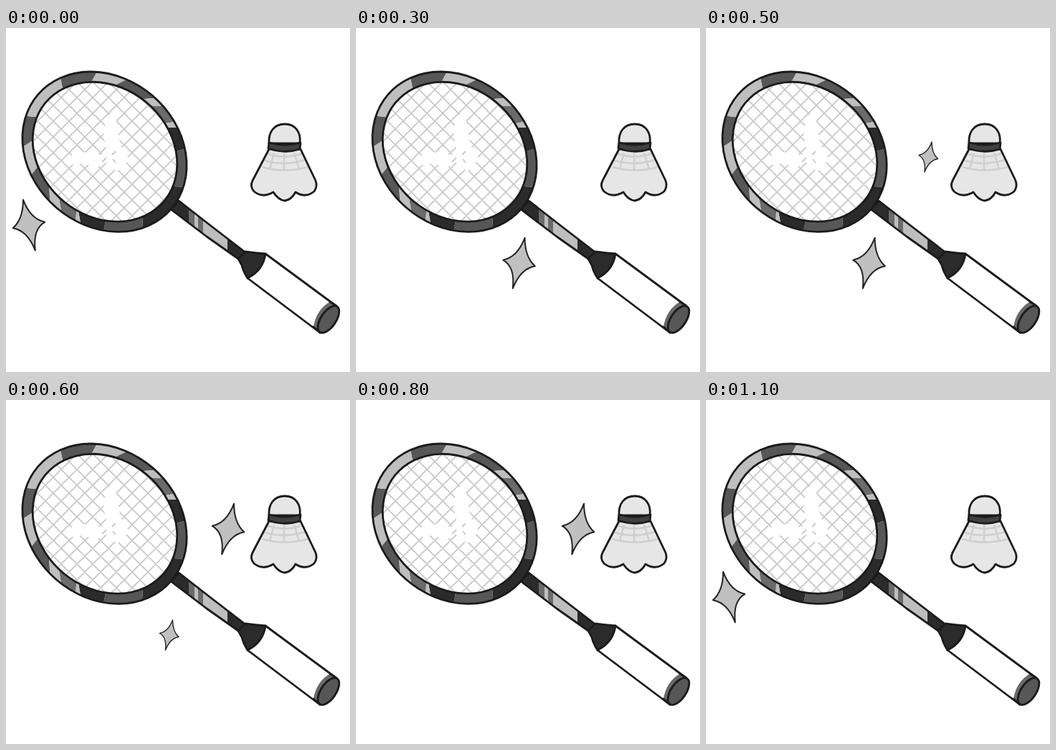
An HTML page that plays this animation: 480 px wide and 480 px high, repeating every 1.2 s.

```html
<!DOCTYPE html>
<html lang="en">
<head>
<meta charset="utf-8">
<title>Badminton</title>
<style>
  html, body { margin: 0; width: 100%; height: 100%; overflow: hidden; background: #fff; }
  svg { display: block; width: 100vw; height: 100vh; }
  .ink { stroke: #1b1b1b; stroke-width: 2.8; stroke-linejoin: round; stroke-linecap: round; }
  .string { stroke: #cacaca; stroke-width: 1.9; fill: none; }
</style>
</head>
<body>
<svg viewBox="0 0 480 480">
  <defs>
    <ellipse id="outer" rx="122.500" ry="103" transform="translate(137.500 172.700) rotate(40.700)"/>
    <ellipse id="inner" rx="107.500" ry="90" transform="translate(138 172.700) rotate(39.400)"/>
    <path id="shaft" d="M230 253L241 241 282 273 334 313 324 322 280 291Z"/>
    <path id="skirt" d="M367 169L344 213Q340 221 346 228Q358 238 373 229Q380 240 389 241Q398 240 404 229Q418 238 430 228Q435 221 432 213L411 169Z"/>
    <clipPath id="headClip"><use href="#outer"/></clipPath>
    <clipPath id="netClip"><use href="#inner"/></clipPath>
    <clipPath id="shaftClip"><use href="#shaft"/></clipPath>
    <clipPath id="skirtClip"><use href="#skirt"/></clipPath>
    <path id="star" d="M9-42Q9-10 26 5Q2 9-11 42Q-7 6-27-5Q-3-10 9-42Z"/>
  </defs>

  <g id="shaftBands" clip-path="url(#shaftClip)"></g>
  <use href="#shaft" class="ink" fill="none"/>

  <g id="rim" clip-path="url(#headClip)"></g>
  <use href="#inner" fill="#fff"/>
  <g clip-path="url(#netClip)">
    <path id="net" class="string"/>
    <path fill="#fff" d="M148 117L154 130 157 148 160 165 168 172 171 186 161 190 155 202 148 192 136 186 128 194 105 189 86 192 84 182 100 173 122 174 133 178 140 168 136 150 139 128Z"/>
    <path class="string" d="M134 187L140 181M148 177L153 172M149 183L153 188"/>
  </g>
  <use href="#outer" class="ink" fill="none"/>
  <use href="#inner" class="ink" fill="none"/>

  <path class="ink" fill="#fff" d="M362 315L461 388 438 425 337 349Z"/>
  <path fill="#686868" d="M452 382Q433 393 429 417L438 425 463 390Z"/>
  <path class="ink" fill="none" d="M452 382L460 387M429 417L438 425"/>
  <ellipse class="ink" fill="#575757" rx="21.500" ry="10.500" transform="translate(450 406.500) rotate(-56)"/>
  <path class="ink" fill="#2b2b2b" d="M324 322L334 312Q348 314 362 315Q359 338 337 349Q331 340 329 331Z"/>

  <g id="shuttle">
    <use href="#skirt" fill="#e6e6e6"/>
    <path clip-path="url(#skirtClip)" fill="none" stroke="#cfcfcf" stroke-width="2.500" d="M364 175Q389 184 413 175M361 185Q389 193 417 184M358 194Q389 203 421 194M374 174L368 197M388 174V199M402 174L409 197"/>
    <use href="#skirt" class="ink" fill="none"/>
    <path class="ink" fill="#e6e6e6" d="M367 161C366 145 374 134 389 134S412 146 410 161Z"/>
    <path class="ink" fill="#414141" d="M367 160Q389 166 411 160L410 169Q389 176 366 168Z"/>
  </g>
  <g id="stars"></g>
</svg>
<script>
const byId = id => document.getElementById(id);
const add = (parent, tag, attrs) => {
  const node = document.createElementNS('http://www.w3.org/2000/svg', tag);
  for (const key in attrs) node.setAttribute(key, attrs[key]);
  return byId(parent).appendChild(node);
};
const DARK = '#2b2b2b', MID = '#575757', SOFT = '#6b6b6b', LIGHT = '#bebebe';

// Clockwise rim joints: outer x, y, inner x, y, colour of the band that follows.
const joints = [
  [76, 70, 79, 84, MID], [127, 61, 120, 74, LIGHT], [168, 72, 154, 79, MID],
  [204, 98, 193, 99, LIGHT], [216, 109, 205, 109, SOFT], [234, 131, 223, 133, LIGHT],
  [238, 139, 227, 139, DARK], [251, 168, 238, 172, MID], [249, 222, 235, 221, DARK],
  [190, 280, 191, 265, MID], [136, 284, 139, 269, DARK], [104, 272, 102, 261, LIGHT],
  [97, 268, 98, 258, SOFT], [77, 255, 74, 238, LIGHT], [61, 236, 60, 224, MID],
  [35, 205, 43, 195, LIGHT], [23, 166, 37, 157, MID], [23, 122, 39, 124, LIGHT]
];
const beyond = ([ox, oy, ix, iy], k) => [ix + (ox - ix) * k, iy + (oy - iy) * k];
joints.forEach((a, i) => {
  const b = joints[(i + 1) % joints.length];
  const dx = a[0] + b[0] - 275, dy = a[1] + b[1] - 345, reach = 150 / Math.hypot(dx, dy);
  const tip = [137.5 + dx * reach, 172.5 + dy * reach];
  const points = [beyond(a, -.3), beyond(a, 1.3), tip, beyond(b, 1.3), beyond(b, -.3)];
  add('rim', 'polygon', { points: points.join(' '), fill: a[4] });
});

[[225, DARK], [255, SOFT], [263, LIGHT], [268, SOFT], [275, LIGHT], [309, DARK]]
  .forEach(([x, fill]) => add('shaftBands', 'rect', { x, y: 235, width: 340 - x, height: 95, fill }));

let net = '';
for (let x = -180; x < 460; x += 22) {
  net += `M${x} 60l230 230M${x + 8} 60l-230 230`;
}
byId('net').setAttribute('d', net);

const STEP = 100, STEPS = 12;
const pulse = [1, .84, .5, .155];
const stars = [
  { x: 31.5, y: 275, flip: -1, sizes: { 9: 3, 10: 2, 11: 1, 0: 1, 1: 2, 2: 3 } },
  { x: 228, y: 328, flip: 1, peak: 4 },
  { x: 310.5, y: 180, flip: 1, peak: 7 }
].map(star => ({ ...star, node: add('stars', 'use', {
  href: '#star', fill: '#c0c0c0', stroke: '#242424', 'stroke-linejoin': 'round'
}) }));

function draw(time) {
  const step = Math.floor(time / STEP) % STEPS;
  for (const { x, y, flip, sizes, peak, node } of stars) {
    const size = pulse[sizes ? sizes[step] : Math.abs(step - peak)] || 0;
    node.setAttribute('visibility', size ? 'visible' : 'hidden');
    if (!size) continue;
    node.setAttribute('transform', `translate(${x} ${y}) scale(${flip * size} ${size})`);
    node.setAttribute('stroke-width', (.5 + 1.8 * size) / size);
  }
}

const start = performance.now();
function tick() {
  draw(performance.now() - start);
  requestAnimationFrame(tick);
}
tick();
</script>
</body>
</html>
```
